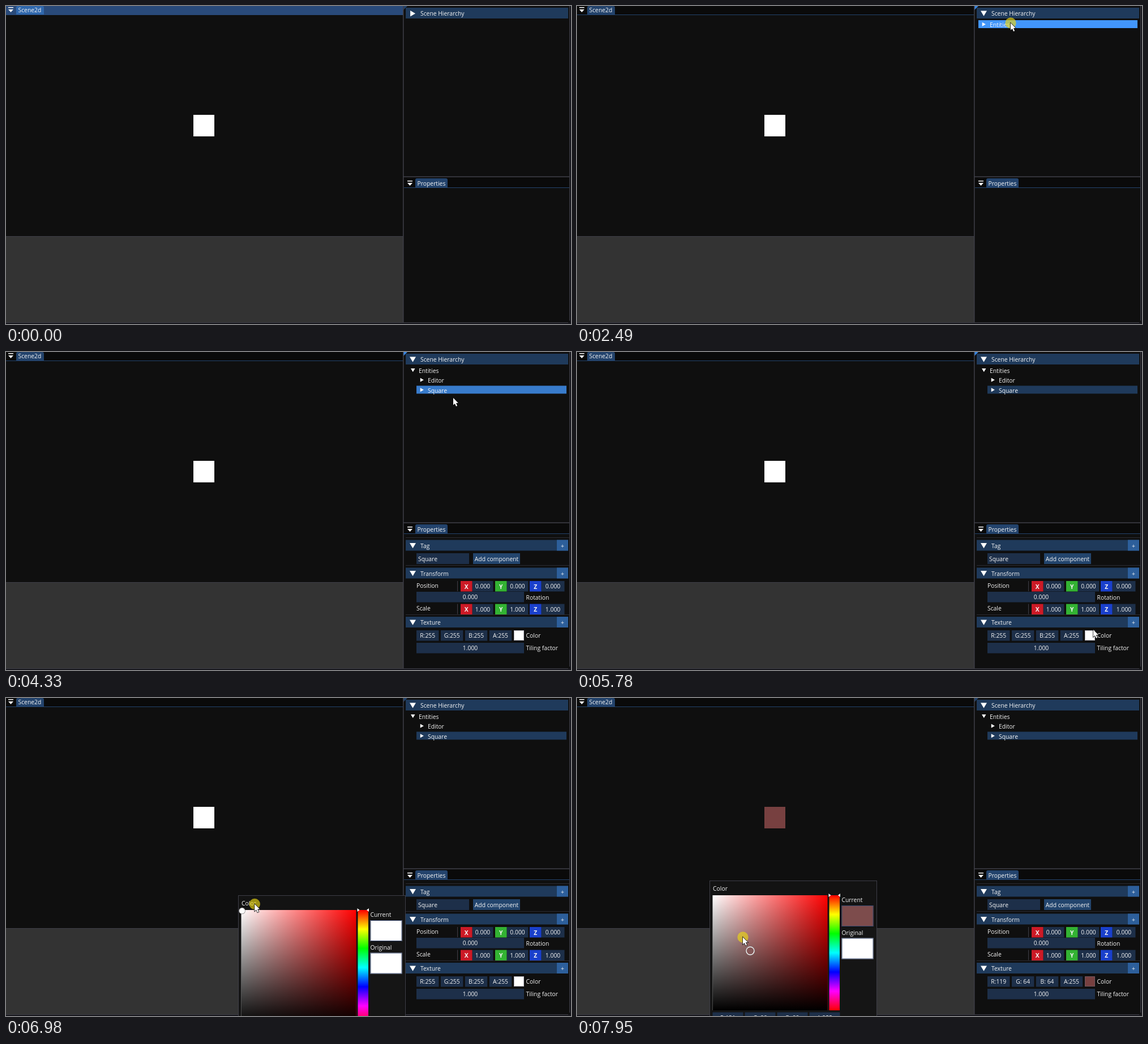
These frames come from a looping animation (998 px wide and 561 px high, 8000 ms). An HTML page with a canvas:

```html
<!DOCTYPE html>
<html lang="en">
<head>
<meta charset="utf-8">
<title>Scene editor</title>
<style>
  html, body { margin: 0; width: 100%; height: 100%; overflow: hidden; background: #17171d; }
  canvas { display: block; width: 998px; height: 561px; }
</style>
</head>
<body>
<canvas id="stage" width="998" height="561"></canvas>
<script>
const ctx = document.getElementById('stage').getContext('2d');
const LOOP = 8000, STEP = 68;

const C = {
  window: '#0f0f0f', titleIdle: '#0a0a0a', titleFocus: '#294a7a',
  tabIdle: '#23436c', tabFocus: '#3068ad', border: '#3e3e47',
  header: '#1f3a5b', hover: '#387bcb', active: '#4296fa',
  frame: '#1d2f49', frameHover: '#23456d', button: '#23456d', buttonHover: '#4296fa',
  plus: '#2d5f9b', text: '#f4f4f4'
};

// The picture refreshes in steps counted from the start of each burst of activity.
const BURSTS = [0, 390, 1220, 1750, 2490, 2700, 3240, 3590, 3990, 4820, 5650, 6350, 7190];

// Pointer path: time, x, y
const PATH = [
  [390, 966, 550], [530, 948, 480], [700, 880, 280], [900, 805, 95], [1138, 772, 29],
  [1220, 769, 20], [1356, 768, 14], [1750, 767, 18], [1886, 766, 30],
  [2558, 766, 30], [2700, 767, 33], [3040, 788, 61], [3240, 787, 61], [3590, 785, 61],
  [4194, 786, 63], [4330, 790, 81], [4534, 800, 230], [4738, 815, 412],
  [5100, 860, 500], [5300, 940, 540], [5500, 930, 505], [5580, 914, 492],
  [5718, 912, 490], [5990, 913, 490], [6130, 926, 493], [6350, 926, 493],
  [6486, 926, 449], [6554, 926, 449], [6690, 850, 430], [6870, 560, 375],
  [7030, 350, 355], [7098, 318, 353], [7326, 263, 338], [7394, 263, 338],
  [7530, 300, 390], [7666, 345, 440], [7802, 333, 456], [7870, 306, 446], [7938, 293, 422]
];

const PRESSES = [[1356, 1492], [2490, 2558], [3990, 4126], [5854, 5990], [6486, 7394], [7530, LOOP]];
const AT = { headerOpen: 1492, entitiesOpen: 2558, selected: 4058, properties: 4126,
             popup: 5990, grab: 6486, drop: 7394, pick: 7530 };
const PICKER = 203;

function pointer(t) {
  const i = PATH.findIndex(p => p[0] > t);
  if (i === 0) return { x: -99, y: -99 };
  if (i < 0) { const [, x, y] = PATH[PATH.length - 1]; return { x, y }; }
  const [t0, x0, y0] = PATH[i - 1], [t1, x1, y1] = PATH[i];
  const k = (t - t0) / (t1 - t0);
  return { x: x0 + (x1 - x0) * k, y: y0 + (y1 - y0) * k };
}

const isPressed = t => PRESSES.some(([a, b]) => t >= a && t < b);

function popupPosition(t) {
  const p = pointer(Math.min(Math.max(t, AT.grab), AT.drop));
  return { x: p.x - 29, y: p.y - 16 };
}

const clamp01 = v => Math.min(1, Math.max(0, v));

function pickedColor(t) {
  let s = 0, v = 1;
  if (t >= AT.pick) {
    const p = pointer(t), o = popupPosition(t);
    s = clamp01((p.x - o.x - 5.5) / PICKER);
    v = clamp01(1 - (p.y - o.y - 26) / PICKER);
  }
  const r = Math.floor(255 * v), g = Math.floor(255 * v * (1 - s));
  return { s, v, channels: [r, g, g, 255], css: `rgb(${r},${g},${g})` };
}

// Drawing helpers
function rect(x, y, w, h, color) {
  ctx.fillStyle = color;
  ctx.fillRect(x, y, w, h);
}

function outline(x, y, w, h, color) {
  ctx.strokeStyle = color;
  ctx.lineWidth = 1;
  ctx.strokeRect(x + .5, y + .5, w - 1, h - 1);
}

function poly(color, ...pts) {
  ctx.beginPath();
  for (let i = 0; i < pts.length; i += 2) ctx.lineTo(pts[i], pts[i + 1]);
  ctx.closePath();
  ctx.fillStyle = color;
  ctx.fill();
}

function disc(x, y, r, color) {
  ctx.beginPath();
  ctx.arc(x, y, r, 0, 7);
  ctx.fillStyle = color;
  ctx.fill();
}

function text(str, x, y, align = 'left', weight = 400) {
  ctx.font = `${weight} 10.35px "Open Sans", "Noto Sans", sans-serif`;
  ctx.textAlign = align;
  ctx.fillStyle = C.text;
  ctx.fillText(str, x, y);
}

function arrow(x, y, open, size) {
  if (open) poly('#fff', x, y, x + size, y, x + size / 2, y + size * .84);
  else poly('#fff', x + size * .1, y - size * .05, x + size * .92, y + size * .43, x + size * .1, y + size * .91);
}

function gradient(x0, y0, x1, y1, stops) {
  const g = ctx.createLinearGradient(x0, y0, x1, y1);
  stops.forEach((c, i) => g.addColorStop(i / (stops.length - 1), c));
  return g;
}

// Widgets; "ui" holds the pointer as the panels see it.
const isOver = (ui, x, y, w, h) =>
  !ui.popup && ui.x >= x && ui.x < x + w && ui.y >= y && ui.y < y + h;

function headerColor(ui, x, y, w, h, idle) {
  return isOver(ui, x, y, w, h) ? (ui.pressed ? C.active : C.hover) : idle;
}

function titleBar(x, y, w, h, label, tabX, tabW, focused) {
  rect(x, y, w, h, focused ? C.titleFocus : C.titleIdle);
  const tab = focused ? C.tabFocus : C.tabIdle;
  rect(x, y + h, w, 1, tab === C.tabFocus ? C.titleFocus : tab);
  ctx.beginPath();
  ctx.roundRect(tabX, y + (y ? 1 : 0), tabW, h, [3, 3, 0, 0]);
  ctx.fillStyle = tab;
  ctx.fill();
  const ix = tabX - 14, iy = y + (y ? 5 : 2);
  rect(ix, iy, 9, 1.5, '#fff');
  poly('#fff', ix, iy + 4, ix + 9, iy + 4, ix + 4.5, iy + 9);
  text(label, tabX + 3.5, iy + 9);
}

function collapsing(ui, y, label, open, plus) {
  rect(706, y, 287, 19, headerColor(ui, 706, y, plus ? 267 : 287, 19, C.header));
  arrow(713, y + 5.5, open, 11);
  text(label, 732, y + 14);
  if (plus) {
    rect(973, y, 20, 19, C.plus);
    text('+', 983, y + 14, 'center');
  }
}

function treeRow(ui, x, y, label, open, selected) {
  const w = 990 - x;
  const color = headerColor(ui, x, y, w, 14, selected ? C.header : null);
  if (color) rect(x, y, w, 14, color);
  arrow(x + 6, y + 4, open, 7.5);
  text(label, x + 20, y + 12);
}

function field(ui, x, y, w, value, h = 18.5) {
  rect(x, y, w, h, isOver(ui, x, y, w, h) ? C.frameHover : C.frame);
  text(value, x + w / 2, y + 13.3, 'center');
}

function vector(ui, y, label, value) {
  text(label, 725, y + 11.5);
  rect(797, y, 1, 18, C.border);
  [['X', 803, '#cc1a26', 37], ['Y', 864, '#33b333', 38], ['Z', 925, '#1a40cc', 41]].forEach(([axis, x, color, w]) => {
    field(ui, x + 20.5, y, w, value);
    rect(x, y, 20.5, 18.5, color);
    text(axis, x + 10.3, y + 13.6, 'center', 700);
  });
}

const channelText = list => list.map((v, i) => 'RGBA'[i] + ':' + String(v).padStart(3, ' '));

function properties(ui, color) {
  [327, 376, 463].forEach(y => rect(706, y, 289, 1, '#2c2c32'));
  collapsing(ui, 331.5, 'Tag', true, true);
  rect(725, 355, 93, 19, C.frame);
  text('Square', 728, 368.5);
  rect(825, 355, 83, 19, isOver(ui, 825, 355, 83, 19) ? C.buttonHover : C.button);
  text('Add component', 866.5, 368.5, 'center');

  collapsing(ui, 380.5, 'Transform', true, true);
  vector(ui, 404, 'Position', '0.000');
  field(ui, 725, 423, 190, '0.000');
  text('Rotation', 918.5, 436.5);
  vector(ui, 444.5, 'Scale', '1.000');

  collapsing(ui, 467, 'Texture', true, true);
  channelText(color.channels).forEach((s, i) => field(ui, 725 + i * 42.9, 491, 39.5, s));
  rect(897, 491, 18, 18, color.css);
  outline(897, 491, 18, 18, 'rgba(110,110,128,.5)');
  text('Color', 918.5, 504);
  field(ui, 725, 513, 190, '1.000');
  text('Tiling factor', 918.5, 526);
}

function swatch(x, y, color) {
  rect(x, y, 56, 37, color);
  outline(x, y, 56, 37, '#3a4a70');
}

function colorPopup(t) {
  const o = popupPosition(t), mark = pickedColor(t - STEP);
  ctx.save();
  ctx.translate(Math.round(o.x), Math.round(o.y));
  rect(0, 0, 296, 290, 'rgba(20,20,20,.97)');
  outline(0, 0, 296, 290, C.border);
  text('Color', 6, 18);

  const px = 5.5, py = 26;
  rect(px, py, PICKER, PICKER, gradient(px, 0, px + PICKER, 0, ['#fff', '#f00']));
  rect(px, py, PICKER, PICKER, gradient(0, py, 0, py + PICKER, ['rgba(0,0,0,0)', '#000']));
  rect(211.5, py, 18.5, PICKER,
    gradient(0, py, 0, py + PICKER, ['#f00', '#ff0', '#0f0', '#0ff', '#00f', '#f0f', '#f00']));
  poly('#fff', 210.5, py - 3, 214.5, py, 210.5, py + 3);
  poly('#fff', 231, py - 3, 227, py, 231, py + 3);

  text('Current', 233.5, 38);
  swatch(233.5, 44, pickedColor(t - STEP * 1.5).css);
  text('Original', 233.5, 95.5);
  swatch(233.5, 101.5, '#fff');
  channelText(mark.channels).forEach((s, i) => field({ popup: true }, px + i * 57, 232.5, 54, s));

  const mx = px + Math.max(1.5, mark.s * PICKER), my = py + Math.max(1.5, (1 - mark.v) * PICKER);
  const r = t - STEP >= AT.pick ? 7.5 : 5;
  disc(mx, my, r + .7, '#808080');
  disc(mx, my, r, '#fff');
  disc(mx, my, r - 1.2, mark.css);
  ctx.restore();
}

function drawPointer(t) {
  const p = pointer(t);
  if (isPressed(t)) disc(p.x, p.y, 9.7, 'rgba(235,215,20,.65)');
  ctx.save();
  ctx.translate(p.x, p.y);
  ctx.beginPath();
  [[0, 0], [0, 12.5], [2.9, 9.9], [5, 14.8], [7.1, 13.9], [5, 9.1], [8.8, 9]].forEach(q => ctx.lineTo(...q));
  ctx.closePath();
  ctx.lineWidth = 1.5;
  ctx.strokeStyle = '#111';
  ctx.stroke();
  ctx.fillStyle = '#fff';
  ctx.fill();
  ctx.restore();
}

function draw(t) {
  const ui = { ...pointer(t - STEP), pressed: isPressed(t), popup: t >= AT.popup };
  const focus = t < 1356 ? 'scene' : t < 5922 ? 'tree' : t < AT.popup ? 'properties' : 'popup';
  const color = pickedColor(t - STEP * 2);

  rect(0, 0, 998, 561, '#17171d');
  rect(0, 0, 701, 406, C.window);
  titleBar(0, 0, 701, 15, 'Scene2d', 18, 49, focus === 'scene');
  rect(331, 192, 37, 38, color.css);
  rect(0, 406, 701, 153, '#333');
  rect(0, 406, 701, 1, C.border);
  rect(0, 558, 701, 1, C.border);

  rect(702, 0, 294, 301, C.window);
  rect(702, 302, 294, 256, C.window);
  poly(focus === 'tree' ? '#3a86e0' : C.tabIdle, 702, 0, 709, 0, 702, 7);
  const open = t >= AT.headerOpen;
  collapsing(ui, 3, 'Scene Hierarchy', open, false);
  if (open) treeRow(ui, 709, 25, 'Entities', t >= AT.entitiesOpen, false);
  if (t >= AT.entitiesOpen) {
    treeRow(ui, 725, 42, 'Editor', false, false);
    treeRow(ui, 725, 59.5, 'Square', false, t >= AT.selected);
  }

  titleBar(703, 303, 292, 17, 'Properties', 723, 57, focus === 'properties');
  if (t >= AT.properties) properties(ui, color);

  rect(701, 0, 1.5, 559, C.border);
  rect(702, 300.5, 294, 1.5, C.border);
  rect(995, 0, 1, 555, C.border);
  rect(702, 558, 291, 1, C.border);

  if (ui.popup) colorPopup(t);
  if (t >= PATH[0][0]) drawPointer(t);
}

function frame(now) {
  const t = now % LOOP;
  const start = BURSTS.filter(b => b <= t).pop();
  draw(start + Math.floor((t - start) / STEP) * STEP);
  requestAnimationFrame(frame);
}

const origin = performance.now();
const tick = () => {
  frameAt(performance.now() - origin);
  requestAnimationFrame(tick);
};

function frameAt(elapsed) {
  const t = elapsed % LOOP;
  const start = BURSTS.filter(b => b <= t).pop();
  draw(start + Math.floor((t - start) / STEP) * STEP);
}

tick();
</script>
</body>
</html>
```
